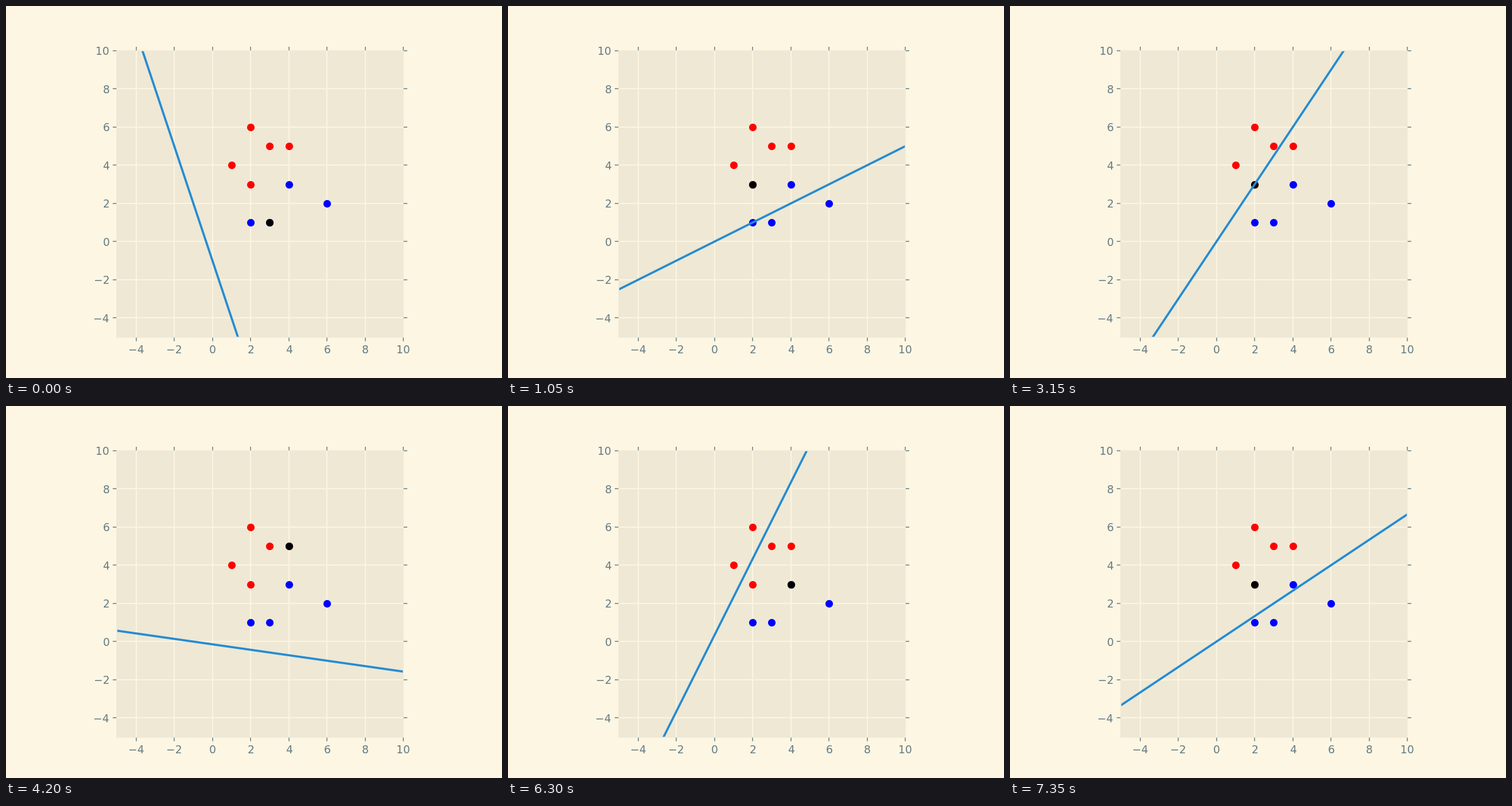
These frames come from a looping animation (864x648 px, 8 s). A matplotlib script:

```python
import numpy as np
import matplotlib.pyplot as plt
from matplotlib.animation import FuncAnimation

LOOP, INTERVAL, HOLD = 8000, 50, 1050
LOW, HIGH = -5, 10

BASE, PANEL, INK, BLUE = "#fdf6e3", "#eee8d5", "#657b83", "#268bd2"

plt.rcParams.update({
    "font.family": "DejaVu Sans",
    "font.size": 10,
    "figure.facecolor": BASE,
    "axes.facecolor": PANEL,
    "axes.edgecolor": PANEL,
    "axes.axisbelow": True,
    "axes.grid": True,
    "grid.color": BASE,
    "grid.linestyle": "-",
    "grid.linewidth": 1,
    "lines.linewidth": 2,
    "lines.solid_capstyle": "butt",
    "xtick.color": INK,
    "ytick.color": INK,
    "xtick.top": True,
    "ytick.right": True,
})

positive = [(2, 1), (3, 1), (4, 3), (6, 2)]
negative = [(1, 4), (2, 3), (2, 6), (3, 5), (4, 5)]

# Misclassified points in the order the perceptron corrects them
picks = [(3, 1), (2, 3), (4, 3), (2, 3), (4, 5), (3, 1), (4, 3), (2, 3)]


def train(points):
    """Weights (a, b, c) of a*x + b*y + c = 0 after each correction."""
    signs = [1 if p in positive else -1 for p in points]
    return np.cumsum([s * np.array([*p, 1]) for s, p in zip(signs, points)], axis=0)


weights = train(picks)

fig, ax = plt.subplots(figsize=(6.4, 4.8), dpi=135)
ax.set_aspect("equal")
ax.set(xlim=(LOW, HIGH), ylim=(LOW, HIGH))
ticks = range(-4, 11, 2)
ax.set_xticks(ticks)
ax.set_yticks(ticks)

ax.plot(*zip(*negative), "o", color="red")
ax.plot(*zip(*positive), "o", color="blue")
current, = ax.plot([], [], "o", color="black")
border, = ax.plot([], [], color=BLUE)
xs = np.array([LOW, HIGH])


def draw(i):
    step = i * INTERVAL // HOLD
    a, b, c = weights[step]
    px, py = picks[step]
    current.set_data([px], [py])
    border.set_data(xs, -(a * xs + c) / b)
    return current, border


anim = FuncAnimation(fig, draw, frames=LOOP // INTERVAL, interval=INTERVAL,
                     repeat=True, repeat_delay=0)
plt.show()
```
